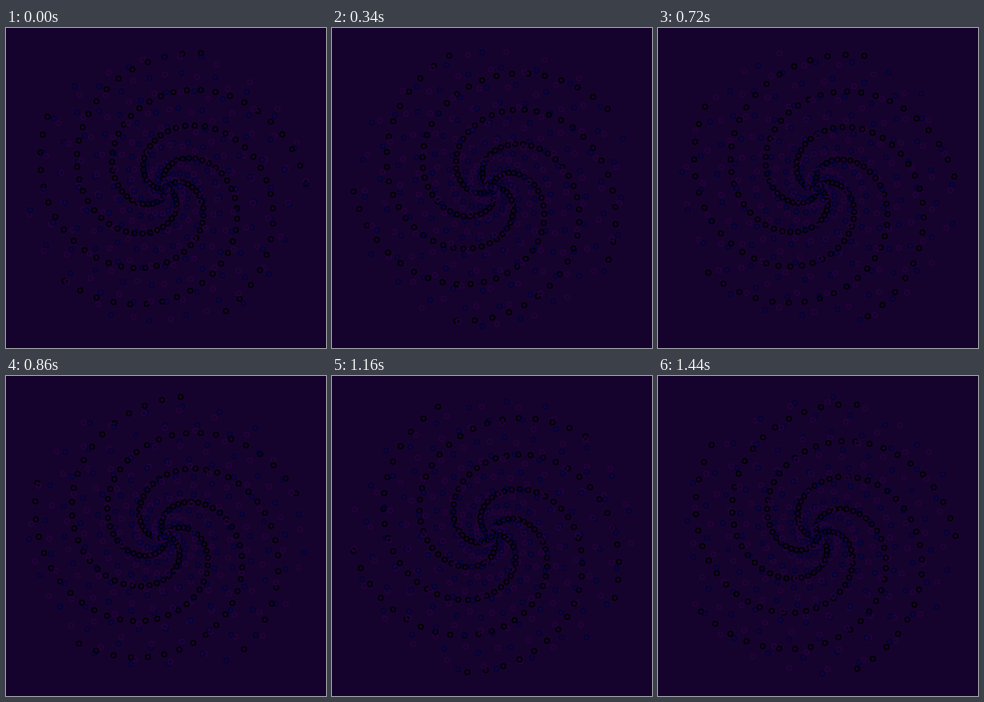
Write an HTML page with a canvas that moves like this. It is 400x400 px and loops after 1460 ms.

```html
<!DOCTYPE html>
<html>
<head>
<meta charset="utf-8">
<style>
html, body { margin: 0; height: 100%; overflow: hidden; background: #16032d; }
canvas { display: block; }
</style>
</head>
<body>
<canvas id="stage" width="400" height="400"></canvas>
<script>
const ctx = document.getElementById('stage').getContext('2d');
const FRAME_MS = 20, FRAMES = 73, RADIUS = 175;

// twist: radians between neighbouring rings; pace: frames per radian of spin
const spirals = [
  { color: '#000000', twist: 5, pace: 30 },
  { color: '#24033a', twist: 3, pace: 20 },
  { color: '#02033a', twist: 1, pace: 50 },
];

function ring(radius, angle, color) {
  ctx.strokeStyle = color;
  ctx.beginPath();
  ctx.arc(200 + radius * Math.cos(angle), 200 + radius * Math.sin(angle), 3, 0, 2 * Math.PI);
  ctx.stroke();
}

function draw(now) {
  const tick = Math.floor(now / FRAME_MS) % FRAMES + 1;
  ctx.fillStyle = '#16032d';
  ctx.fillRect(0, 0, 400, 400);
  ctx.lineWidth = 1.5;
  for (let i = 0; i < RADIUS; i++) {
    for (const { color, twist, pace } of spirals) {
      ring(RADIUS - i, twist * i - tick / pace, color);
    }
  }
}

const start = performance.now();
function loop() {
  draw(performance.now() - start);
  requestAnimationFrame(loop);
}
loop();
</script>
</body>
</html>
```
